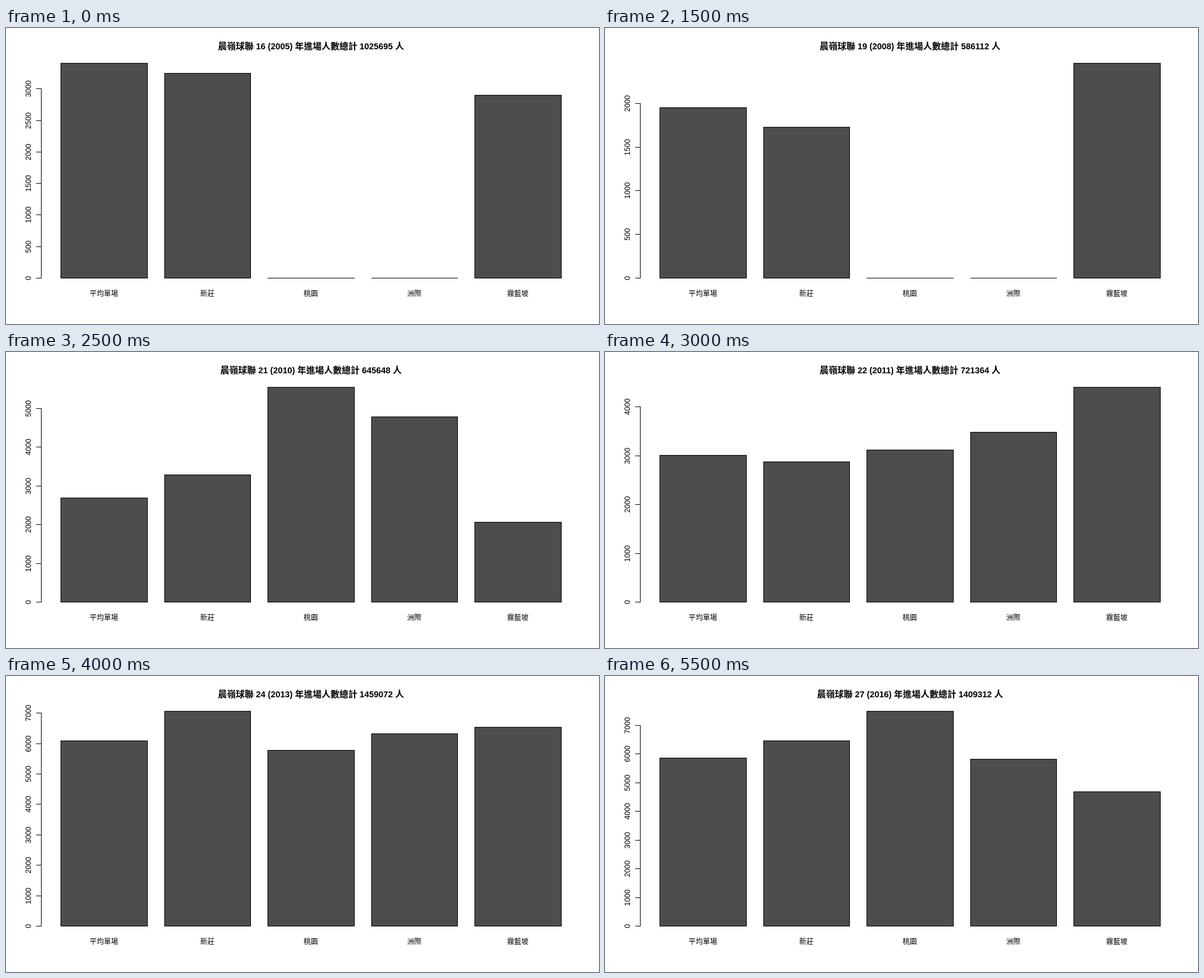
Animation, 1000 px wide and 500 px high, one loop 6000 ms. Source, as an HTML page with a canvas:

```html
<!DOCTYPE html>
<html lang="zh-Hant">
<head>
<meta charset="utf-8">
<title>進場人數</title>
<style>
html, body { margin: 0; width: 100%; height: 100%; overflow: hidden; background: #fff; }
canvas { display: block; }
</style>
</head>
<body>
<canvas id="stage" width="1000" height="500"></canvas>
<script>
const ctx = document.getElementById('stage').getContext('2d');
const LATIN = '"Liberation Sans", Arial, sans-serif';
const HAN = '"Noto Sans CJK TC", "Noto Sans CJK", "Noto Sans CJK JP", sans-serif';
const HOLD = 500, BASE = 422, HEIGHT = 363, CENTER = 514.4;
const venues = ['平均單場', '新莊', '桃園', '洲際', '霧藍坡'];

// total attendance, then one value per bar
const seasons = [
  [1025695, 3408, 3248, 0, 0, 2901],
  [679205, 2266, 1737, 0, 0, 2742],
  [614827, 2049, 1810, 0, 0, 2660],
  [586112, 1954, 1725, 0, 0, 2460],
  [898323, 3743, 3681, 0, 0, 3413],
  [645648, 2690, 3287, 5550, 4785, 2064],
  [721364, 3006, 2870, 3120, 3480, 4400],
  [583805, 2440, 2053, 2373, 3000, 4840],
  [1459072, 6079, 7060, 5780, 6320, 6540],
  [1224730, 5103, 4126, 6241, 4607, 4418],
  [1322754, 5511, 5390, 7060, 5460, 4380],
  [1409312, 5872, 6463, 7496, 5823, 4688]
];

function rect(x0, y0, x1, y1, color = '#000') {
  ctx.fillStyle = color;
  ctx.fillRect(x0, y0, x1 - x0 + 1, y1 - y0 + 1);
}

function drawTitle(index, total) {
  const han = `bold 15px ${HAN}`, latin = `bold 14.4px ${LATIN}`;
  const runs = [
    [han, '晨嶺球聯'],
    [latin, ` ${16 + index} (${2005 + index}) `],
    [han, '年進場人數總計'],
    [latin, ` ${total} `],
    [han, '人']
  ];
  const widths = runs.map(([font, text]) => {
    ctx.font = font;
    return ctx.measureText(text).width;
  });
  let x = CENTER - widths.reduce((a, b) => a + b) / 2;
  ctx.textAlign = 'left';
  ctx.fillStyle = '#000';
  runs.forEach(([font, text], i) => {
    ctx.font = font;
    ctx.fillText(text, x, 36);
    x += widths[i];
  });
}

function drawAxis(max, toY) {
  const step = max > 3800 ? 1000 : 500;
  const last = Math.floor(max / step) * step;
  rect(59, toY(last), 59, BASE);
  ctx.font = `12.5px ${LATIN}`;
  ctx.textAlign = 'center';
  for (let v = 0; v <= last; v += step) {
    const y = toY(v);
    rect(51, y, 59, y);
    ctx.save();
    ctx.translate(42, y + 0.5);
    ctx.rotate(-Math.PI / 2);
    ctx.fillText(v, 0, 0);
    ctx.restore();
  }
}

function drawBars(values, toY) {
  ctx.font = `12px ${HAN}`;
  ctx.textAlign = 'center';
  values.forEach((v, i) => {
    const shift = 174.5 * i;
    const left = Math.round(92 + shift), right = Math.floor(238 + shift);
    const top = toY(v);
    rect(left, top, right, BASE);
    if (v) rect(left + 1, top + 1, right - 1, BASE - 1, '#4d4d4d');
    ctx.fillStyle = '#000';
    ctx.fillText(venues[i], 165 + shift, 453);
  });
}

function draw(index) {
  const [total, ...values] = seasons[index];
  const max = Math.max(...values);
  const toY = v => Math.round(BASE - HEIGHT * v / max);
  rect(0, 0, 999, 499, '#fff');
  drawTitle(index, total);
  drawAxis(max, toY);
  drawBars(values, toY);
}

const start = performance.now();
function tick() {
  const t = Math.max(0, performance.now() - start);
  draw(Math.floor(t / HOLD) % seasons.length);
  requestAnimationFrame(tick);
}
tick();
</script>
</body>
</html>
```
